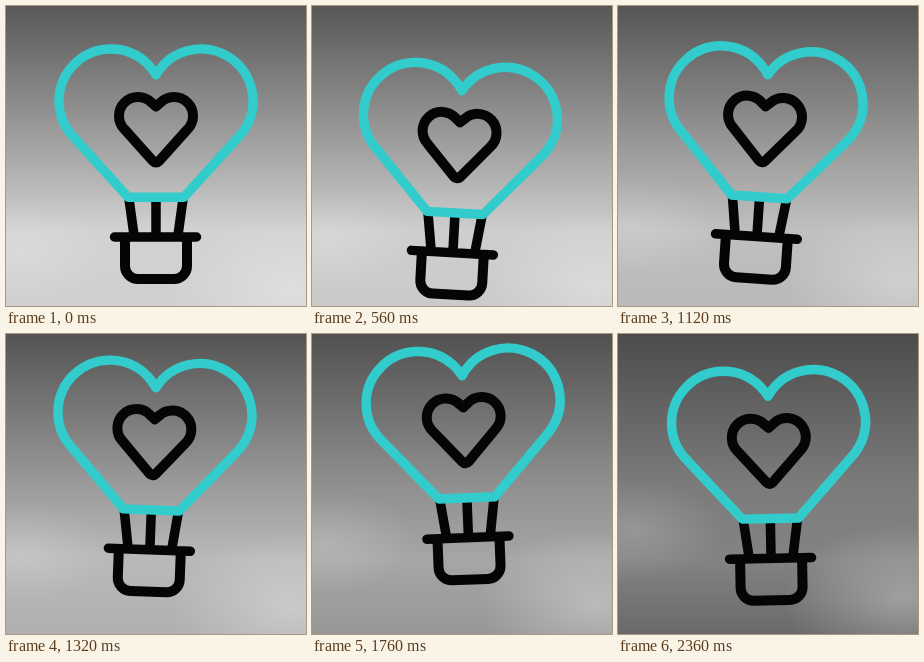
Write an HTML page with a canvas that moves like this. It is 300 by 300 pixels and loops after 2.38 s.

```html
<!DOCTYPE html>
<html lang="en">
<head>
<meta charset="utf-8">
<title>Heart balloon</title>
<style>
html, body { margin: 0; width: 100%; height: 100%; overflow: hidden; background: #888; }
canvas { display: block; width: 300px; height: 300px; }
</style>
</head>
<body>
<canvas id="stage" width="300" height="300"></canvas>
<script>
const ctx = document.getElementById('stage').getContext('2d');
const { PI, cos, round } = Math;
const LOOP = 2380;
const TEAL = '#33cccc', INK = '#050505';

// Turning points as [time, value]; the loop cuts before the last one
const lift = [[0, 0], [720, 18], [1650, -28], [2700, 0]];
const tilt = [[0, 0], [900, 4.6], [2000, -3.1], [2600, 0]];

// Sine ease between neighbouring turning points
function sway(keys, t) {
  const i = keys.findIndex(([time]) => time > t);
  const [t0, v0] = keys[i - 1], [t1, v1] = keys[i];
  return v0 + (v1 - v0) * (1 - cos(PI * (t - t0) / (t1 - t0))) / 2;
}

function glow(x, y, rx, ry, alpha) {
  ctx.save();
  ctx.translate(x, y);
  ctx.scale(rx, ry);
  const g = ctx.createRadialGradient(0, 0, 0, 0, 0, 1);
  g.addColorStop(0, `rgba(255,255,255,${alpha})`);
  g.addColorStop(1, 'rgba(255,255,255,0)');
  ctx.fillStyle = g;
  ctx.fillRect(-1, -1, 2, 2);
  ctx.restore();
}

// Clouds darken from the bottom up as the loop runs
function drawSky(p) {
  const g = ctx.createLinearGradient(0, 0, 0, 300);
  const stop = (at, light, fade) => {
    const v = round(light - fade * p * p);
    g.addColorStop(at, `rgb(${v},${v},${v})`);
  };
  stop(0, 88, 12);
  stop(0.5, 168, 46);
  stop(0.75, 210, 80);
  stop(1, 208, 104);
  ctx.fillStyle = g;
  ctx.fillRect(0, 0, 300, 300);
  glow(15, 245 - 50 * p, 90, 50, 0.18);
  glow(285, 285 - 20 * p, 120, 75, 0.3);
}

function stroke(color, width, build) {
  ctx.strokeStyle = color;
  ctx.lineWidth = width;
  ctx.beginPath();
  build();
  ctx.stroke();
}

function line(x1, y1, x2, y2) {
  ctx.moveTo(x1, y1);
  ctx.lineTo(x2, y2);
}

function drawBalloon(t) {
  ctx.save();
  ctx.translate(150, 66 + sway(lift, t));
  ctx.rotate(sway(tilt, t) * PI / 180);
  ctx.translate(-150, -66);
  ctx.lineJoin = ctx.lineCap = 'round';

  stroke(INK, 9.5, () => {
    for (const side of [-1, 0, 1]) line(150 + 27 * side, 193, 150 + 22 * side, 229);
    line(108.5, 231, 190.5, 231);
  });
  stroke(INK, 10, () => {
    ctx.moveTo(119, 233);
    ctx.arcTo(119, 273, 150, 273, 13);
    ctx.arcTo(181, 273, 181, 233, 13);
    ctx.lineTo(181, 233);
  });
  stroke(INK, 10, () => {
    ctx.moveTo(150, 100.5);
    ctx.arc(168, 110, 19, 1.25 * PI, 0.25 * PI);
    ctx.arcTo(150, 158.5, 118.6, 123.4, 4);
    ctx.arc(132, 110, 19, 0.75 * PI, -0.25 * PI);
    ctx.closePath();
  });
  stroke(TEAL, 9.4, () => {
    ctx.moveTo(122, 191.2);
    ctx.arc(105, 95, 52, 0.75 * PI, -0.525);
    ctx.arc(195, 95, 52, PI + 0.525, 0.25 * PI);
    ctx.lineTo(178, 191.2);
    ctx.closePath();
  });
  ctx.restore();
}

const start = performance.now();

function tick() {
  const t = (performance.now() - start) % LOOP;
  drawSky(t / LOOP);
  drawBalloon(t);
  requestAnimationFrame(tick);
}
tick();
</script>
</body>
</html>
```
